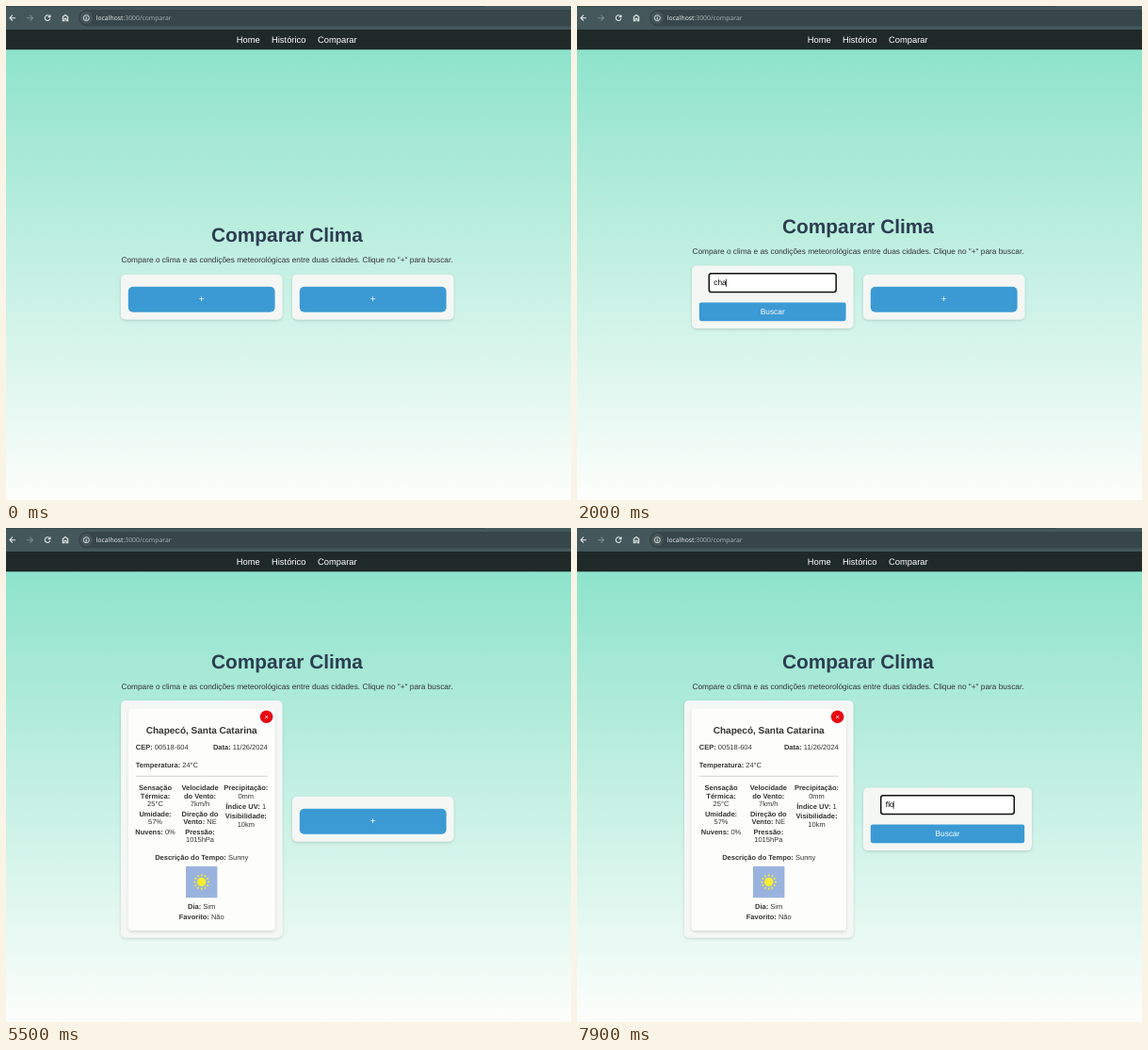
These frames come from a looping animation (600 by 524 pixels, 8000 ms). An HTML page:

```html
<!DOCTYPE html>
<html lang="pt">
<head>
<meta charset="utf-8">
<title>Comparar Clima</title>
<style>
  html, body { margin: 0; width: 100%; height: 100%; overflow: hidden; background: #fff; }
  svg { display: block; width: 600px; height: 524px; }
  text { font-family: "Liberation Sans", Arial, sans-serif; text-rendering: geometricPrecision; white-space: pre; }
</style>
</head>
<body>
<svg viewBox="0 0 600 524">
  <defs>
    <linearGradient id="sky" x1="0" y1="0" x2="0" y2="1">
      <stop offset="0" stop-color="#8ee3cb"/>
      <stop offset="1" stop-color="#fdfefc"/>
    </linearGradient>
    <filter id="shadow" x="-10%" y="-20%" width="120%" height="150%">
      <feDropShadow dx="0" dy="1.3" stdDeviation="1.4" flood-color="#000" flood-opacity=".15"/>
    </filter>
  </defs>
  <rect y="46" width="600" height="478" fill="url(#sky)"/>
  <g id="browser"></g>
  <g id="page"></g>
</svg>
<script>
const LOOP = 8000;
const BODY = 8.33, SMALL = 7.5;
const BLUE = [59, 154, 211], HOVER = [48, 129, 179], PRESSED = [44, 120, 167];
const PLACEHOLDER = 'Digite o nome da cidade';

const rect = (x, y, w, h, r, fill, extra = '') =>
  `<rect x="${x}" y="${y}" width="${w}" height="${h}" rx="${r}" fill="${fill}" ${extra}/>`;

// *word* marks bold text
const text = (x, y, str, size = BODY, fill = '#333', anchor = 'start', extra = '') =>
  `<text x="${x}" y="${y}" font-size="${size}" fill="${fill}" text-anchor="${anchor}" ${extra}>` +
  str.replace(/\*(.+?)\*/g, '<tspan font-weight="bold">$1</tspan>') + '</text>';

const centered = (x, y, str, size, fill) => text(x, y, str, size, fill, 'middle');

const ease = p => { p = Math.min(1, Math.max(0, p)); return p * p * (3 - 2 * p); };
const blend = (from, to, p) =>
  `rgb(${from.map((v, i) => Math.round(v + (to[i] - v) * p)).join()})`;
const latest = (steps, t) => steps.reduce((value, [at, v]) => t >= at ? v : value, '');

function browser() {
  const icon = (d, color = '#e6ecec') =>
    `<path d="${d}" fill="none" stroke="${color}" stroke-width="1.1"/>`;
  return rect(0, 0, 600, 25, 0, '#44575b') +
    rect(0, 0, 509, 1, 0, '#35474b') +
    rect(77, 4, 540, 17.5, 8.7, '#36464a') +
    icon('M10 12.7H4M7 9.7L4 12.7L7 15.7') +
    icon('M22 12.7H28.5M25.5 9.7L28.5 12.7L25.5 15.7', '#7e8c8f') +
    icon('M46.4 11A2.8 2.8 0 1 0 46.8 13.4M47 9.5V11.6H44.7') +
    icon('M60.3 15.8V11.5L63 9.5L65.7 11.5V15.8H64V13.2H62V15.8Z') +
    '<circle cx="85.3" cy="12.7" r="6.6" fill="#465558"/>' +
    '<circle cx="85.3" cy="12.7" r="3" fill="none" stroke="#e6ecec" stroke-width=".9"/>' +
    icon('M85.3 12.3V14.4M85.3 10.9V11.6') +
    `<text x="95.7" y="15.1" font-size="6.82" fill="#a5b0b2" style="font-family:'Noto Sans','Open Sans',sans-serif">` +
    '<tspan fill="#e6ecec">localhost</tspan>:3000/comparar</text>' +
    rect(0, 25, 600, 21.3, 0, '#1f2928') +
    text(244.8, 38.5, 'Home', 9.38, '#fff') +
    text(282, 38.5, 'Histórico', 9.38, '#fff') +
    text(331, 38.5, 'Comparar', 9.38, '#fff');
}

const panel = (x, y, w, h) => rect(x, y, w, h, 5, '#f5f7f5', 'filter="url(#shadow)"');

function addCard(x, color) {
  return panel(x, 285, 171.4, 47.5) + rect(x + 7.8, 297.8, 155.8, 27, 5, color) +
    centered(x + 85.7, 314.4, '+', BODY * 1.2, '#fff');
}

function formCard(x, w, color, { value, focused, caret }) {
  const mid = x + w / 2;
  const fieldW = (w - 15.6) * .87;
  const left = mid - fieldW / 2;
  const textX = left + 5.4;
  const border = focused ? 'stroke="#101010" stroke-width="1.5"' : 'stroke="#ccc" stroke-width=".6"';
  const field = value
    ? `<text x="${textX}" y="296.2" font-size="${BODY}" fill="#000">${value}` +
      `<tspan dx="-1.6" font-size="${BODY * 1.05}" fill="${caret ? '#000' : 'none'}">|</tspan></text>`
    : text(textX, 296.2, PLACEHOLDER, BODY, '#757575') +
      (caret ? rect(textX, 288.6, .6, 9.4, 0, '#000') : '');
  return panel(x, 275.5, w, 66.5) +
    rect(left + .3, 283.7, fieldW - .6, 19.8, 2.4, '#fff', border) + field +
    rect(x + 7.8, 314.4, w - 15.6, 19.8, 2.1, color) +
    centered(mid, 327.2, 'Buscar', BODY, '#fff');
}

function sun(x, y) {
  let rays = '';
  for (let i = 0; i < 12; i++) {
    rays += `<path d="M0 -6.2V-8.3" transform="rotate(${i * 30})" stroke="#f6ee2e" stroke-width="1.5"/>`;
  }
  return rect(x - 16.7, y - 16.7, 33.4, 33.4, 0, '#9ab3de') +
    `<g transform="translate(${x} ${y})"><circle r="4.7" fill="#f6ee2e"/>${rays}</g>`;
}

function weatherCard(x, columns) {
  const right = 293.5, left = x + 15.8;
  const mid = (x + 7.8 + 285.6) / 2;
  const small = (cx, cy, str) => centered(cx, cy + 2.7, str, SMALL);
  const details = [
    [[275.5, '*Sensação*'], [284, '*Térmica:*'], [292.5, '25°C'], [303, '*Umidade:*'], [311.3, '57%'], [322.2, '*Nuvens:* 0%']],
    [[275.5, '*Velocidade*'], [284, '*do Vento:*'], [292.5, '7km/h'], [303, '*Direção do*'], [311.3, '*Vento:* NE'], [322.2, '*Pressão:*'], [330.6, '1015hPa']],
    [[275.5, '*Precipitação:*'], [284, '0mm'], [294.8, '*Índice UV:* 1'], [305.7, '*Visibilidade:*'], [314, '10km']]
  ];
  return panel(x, 183, right - x, 251.5) +
    rect(x + 7.8, 191.5, 277.8 - x, 235.5, 4, '#fdfefc', 'filter="url(#shadow)"') +
    '<circle cx="276.6" cy="200.2" r="6.8" fill="#e60a12"/>' +
    centered(276.6, 202.6, '×', SMALL, '#fff') +
    centered(mid, 217.5, '*Chapecó, Santa Catarina*', 10) +
    text(left, 234.8, '*CEP:* 00518-604', SMALL) +
    text(277.8, 234.8, '*Data:* 11/26/2024', SMALL, '#333', 'end') +
    text(left, 253.5, '*Temperatura:* 24°C', SMALL) +
    rect(left, 262.8, 277.8 - left, .8, 0, '#c6c8c7') +
    details.map((rows, i) => rows.map(([y, str]) => small(columns[i], y, str)).join('')).join('') +
    small(mid, 349.2, '*Descrição do Tempo:* Sunny') +
    sun(mid, 375.5) +
    small(mid, 401.2, '*Dia:* Sim') +
    small(mid, 412, '*Favorito:* Não');
}

function leftSide(t) {
  if (t < 700) return addCard(122, blend(BLUE, HOVER, ease((t - 150) / 350)));
  if (t < 5500) {
    const focused = t >= 1100 && t < 4800;
    return formCard(122, 171.4, blend(BLUE, PRESSED, ease((t - 4300) / 400)), {
      value: latest([[1700, 'c'], [1800, 'ch'], [1900, 'cha'], [2400, 'chape'], [3100, 'chapec'], [3200, 'chapecó']], t),
      focused,
      caret: focused && !(t >= 2800 && t < 3100) && t < 3900
    });
  }
  return t < 6500
    ? weatherCard(122, [158.5, 206, 254.8])
    : weatherCard(114, [153, 203.3, 254.5]);
}

function rightSide(t) {
  if (t < 6500) return addCard(304, blend(BLUE, HOVER, ease((t - 5650) / 350)));
  const focused = t >= 6900;
  return formCard(304, 179, blend(BLUE, HOVER, 0), {
    value: latest([[7500, 'f'], [7800, 'fl'], [7900, 'flo']], t),
    focused,
    caret: focused
  });
}

function draw(t) {
  const shift = t < 700 ? 0 : t < 5500 ? -9.5 : -101.3;
  return centered(298.5, 250 + shift, '*Comparar Clima*', 20.84, '#2c3e50') +
    centered(298.5, 272 + shift, 'Compare o clima e as condições meteorológicas entre duas cidades. Clique no "+" para buscar.', 8.31) +
    leftSide(t) + rightSide(t);
}

const page = document.getElementById('page');
let shown = '';

function update() {
  const markup = draw(performance.now() % LOOP);
  if (markup !== shown) page.innerHTML = shown = markup;
  requestAnimationFrame(update);
}

document.getElementById('browser').innerHTML = browser();
update();
</script>
</body>
</html>
```
